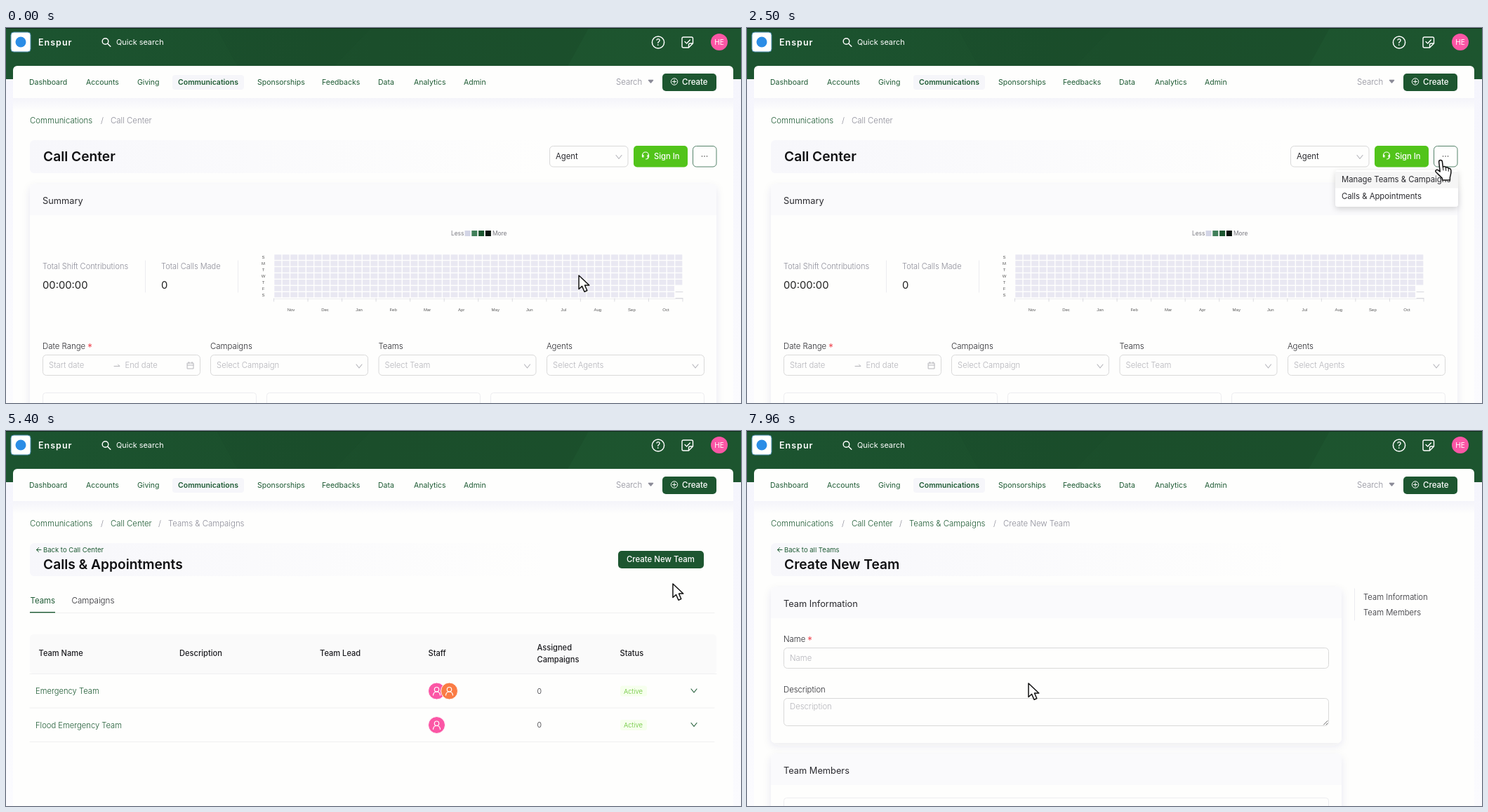
These frames come from a looping animation (1047 by 535 pixels, 8 s). An HTML page:

```html
<!DOCTYPE html>
<html lang="en">
<head>
<meta charset="utf-8">
<title>Call center walkthrough</title>
<style>
html, body { margin: 0; width: 100%; height: 100%; overflow: hidden; background: #fdfdfd; }
svg { display: block; width: 100%; height: 100%; font-family: Inter, "Noto Sans", sans-serif; }
</style>
</head>
<body>
<svg viewBox="0 0 1047 535">
  <defs>
    <linearGradient id="banner"><stop offset="0" stop-color="#1c5430"/><stop offset=".5" stop-color="#1b4e2b"/><stop offset="1" stop-color="#1b502c"/></linearGradient>
    <linearGradient id="page" x2="0" y2="1"><stop offset="0" stop-color="#f4f4fc"/><stop offset="1" stop-color="#fbfbfe"/></linearGradient>
    <linearGradient id="navShade" x2="0" y2="1"><stop offset="0" stop-color="#f4f4fa"/><stop offset="1" stop-color="#fefefd"/></linearGradient>
    <linearGradient id="heading"><stop offset="0" stop-color="#f7f7fb"/><stop offset=".75" stop-color="#fefefd"/></linearGradient>
    <filter id="soft" x="-10%" y="-20%" width="120%" height="150%"><feDropShadow dx="0" dy="4" stdDeviation="6" flood-color="#3c3c78" flood-opacity=".09"/></filter>
    <filter id="popup" x="-10%" y="-30%" width="120%" height="170%"><feDropShadow dx="0" dy="3" stdDeviation="4" flood-opacity=".16"/></filter>
  </defs>
  <g id="shell"></g>
  <g id="summary"></g>
  <g id="menu"></g>
  <g id="teams"></g>
  <g id="form"></g>
  <g id="status"></g>
  <g id="arrow"><path d="M0 0V19.5L4.6 15.4 8 23.2 11.8 21.5 8.5 14H14.8Z" fill="#fff" stroke="#111" stroke-width="1.5" stroke-linejoin="round"/></g>
  <g id="hand"><path d="M-2.6 2.6C-2.6-.6 2-.6 2.2 2.4L3.2 10.4C4.2 8.6 7 9 7.2 11 8.4 9.8 10.8 10.3 11 12.2 13.4 11.4 14.6 13 14.7 15.5 15 20 13.6 22 13.2 25V28.6H2.2V26C-1 23.4-3.6 20-6.8 17.2-8.8 14.8-5.6 13.2-3.6 14.6L-1 16.6Z" fill="#fff" stroke="#111" stroke-width="1.5" stroke-linejoin="round"/><path d="M3.2 10.4 3.7 15M7.2 11 7.5 15.6M11 12.2V16.4" fill="none" stroke="#111"/></g>
</svg>
<script>
const $ = id => document.getElementById(id);
const GREEN = '#1d5a33', INK = '#2b2b30', GREY = '#8c8c98', HINT = '#b4b4ba', LINE = '#d9d9d9';
const LOOP = 8000;

// y is the middle of the capital letters
const text = (x, y, s, size = 11.3, fill = INK, weight = 300, extra = '') =>
  `<text x="${x}" y="${y + size * .36}" font-size="${size}" fill="${fill}" font-weight="${weight}" ${extra}>${s.replace('&', '&amp;')}</text>`;
const rect = (x, y, w, h, r, fill, stroke = 'none', extra = '') =>
  `<rect x="${x}" y="${y}" width="${w}" height="${h}" rx="${r}" fill="${fill}" stroke="${stroke}" ${extra}/>`;
const path = (d, stroke, width = 1, fill = 'none') =>
  `<path d="${d}" fill="${fill}" stroke="${stroke}" stroke-width="${width}" stroke-linecap="round" stroke-linejoin="round"/>`;
const circle = (x, y, r, fill, stroke = 'none', width = 1) =>
  `<circle cx="${x}" cy="${y}" r="${r}" fill="${fill}" stroke="${stroke}" stroke-width="${width}"/>`;
const chevron = (x, y, color = HINT) => path(`M${x - 4} ${y - 2}l4 5 4-5`, color, 1.1);
const required = (x, y) => text(x, y + 2, '*', 14, '#f0505a', 400);
const list = (items, draw) => items.map(draw).join('');

const card = (y, w, h, title) =>
  rect(34, y, w, h, 6, '#fefefd', 'none', 'filter="url(#soft)"') +
  path(`M34 ${y + 44}V${y + 6}q0-6 6-6H${28 + w}q6 0 6 6V${y + 44}Z`, 'none', 0, '#fafafc') +
  text(52, y + 23, title, 12.8, INK, 400);

const crumbs = items => list(items, ([x, s], i) =>
  (i ? text(x - 14, 132, '/', 11.3, GREY) : '') +
  text(x, 132, s, 11.4, i == items.length - 1 ? GREY : GREEN));
const heading = (title, back) => rect(34, 160, 978, 47, 6, 'url(#heading)') +
  (back ? path('M50 169.5H43.5M46.5 166.5l-3 3 3 3', GREEN) + text(53, 169.5, back, 9.5, GREEN, 400) : '') +
  text(53, back ? 190.5 : 183, title, 19.2, '#101012', 600);

function drawShell() {
  const nav = [[33, 'Dashboard'], [114, 'Accounts'], [187, 'Giving'], [245, 'Communications'], [358, 'Sponsorships'],
    [450, 'Feedbacks'], [530, 'Data'], [581, 'Analytics'], [652, 'Admin']];
  return rect(0, 0, 1047, 535, 0, 'url(#page)') + rect(0, 0, 1047, 73, 0, 'url(#banner)') +
    path('M300 0H520L450 73H340Z', 'none', 0, '#1a4a2840') + path('M830 0H1047V73H790Z', 'none', 0, '#26693a30') +
    rect(0, 0, 1047, 1, 0, '#0e2a17') +
    rect(10, 54, 1026, 500, 6, '#fefefd') + rect(10, 100, 1026, 18, 0, 'url(#navShade)') +
    rect(7, 6, 28, 28, 4, '#fff', '#4d8fb0') + circle(21, 20, 7.5, '#2b8de6') +
    text(46, 20, 'Enspur', 12.5, '#fff', 600, 'letter-spacing="1"') +
    circle(141.5, 19, 4.3, 'none', '#fff', 1.4) + path('M144.8 22.3l4 4', '#fff', 1.5) +
    text(157, 20, 'Quick search', 10.9, '#fff', 400) +
    circle(929, 20.5, 8.6, 'none', '#fff', 1.5) + text(929, 20.5, '?', 12.5, '#fff', 500, 'text-anchor="middle"') +
    path('M978.5 22V15q0-2-2-2H965q-2 0-2 2V26q0 2 2 2H972.5L978.5 22H974.5q-2 0-2 2V28M967 19.5l2.6 2.6 4.8-5', '#fff', 1.4) +
    circle(1016, 20, 12, '#fb56a5') + text(1016, 20.5, 'HE', 10, '#fff', 400, 'text-anchor="middle"') +
    rect(237, 67, 102, 21, 4, '#f6f6fa') +
    list(nav, ([x, s], i) => text(x, 77, s, 10.5, GREEN, i == 3 ? 600 : 400)) +
    text(869, 77, 'Search', 11.4, GREY) + path('M915.5 74.5h6l-3 3.5Z', GREY, 1.5, GREY) +
    rect(935, 65, 77, 25, 5, '#1d5630') + circle(952, 76.5, 4.7, 'none', '#fff') + path('M949.5 76.5h5M952 74v5', '#fff') +
    text(963, 77, 'Create', 11.5, '#fff', 500);
}

function drawHeatmap() {
  const months = 'Nov Dec Jan Feb Mar Apr May Jun Jul Aug Sep Oct'.split(' ');
  const label = (x, y, s) => text(x, y, s, 6, '#555', 400, 'text-anchor="middle" font-family="Liberation Sans, sans-serif"');
  let out = '';
  for (let col = 0; col < 51; col++)
    for (let row = 0; row < 7; row++)
      if (col < 50 || row < 5) out += rect(382.3 + col * 11.42, 323.3 + row * 8.93, 10, 7.5, 0, '#e9e8f2');
  return out + path('M954 376.5h10M954 385.5h10', '#d8d8de') +
    path('M381.5 386.5H964', '#e2e2e8', .6) +
    list([...Array(13).keys()], i => path(`M${381.5 + i * 48.54} 386v4`, '#d4d4da', .8)) +
    list(months, (s, i) => label(406 + i * 48.54, 402, s)) +
    list([...'SMTWTFS'], (s, i) => label(366.5, 327 + i * 8.9, s)) +
    text(634, 293, 'Less', 8.4, '#77777f', 400) + text(693, 293, 'More', 8.4, '#77777f', 400) +
    list(['#d3d5e6', '#41805a', '#1d5630', '#08120b'], (c, i) => rect(653.5 + i * 9.8, 289, 8, 8, 0, c));
}

function drawSummary() {
  const fields = [[52, 'Date Range', ''], [291, 'Campaigns', 'Select Campaign'], [530.5, 'Teams', 'Select Team'], [770, 'Agents', 'Select Agents']];
  return crumbs([[34, 'Communications'], [149, 'Call Center']]) + heading('Call Center') +
    rect(774.5, 168.5, 111.5, 29.5, 5, '#fefefd', LINE, 'id="agent"') + text(783, 183, 'Agent', 11.3, INK, 400) + chevron(873, 183.5) +
    rect(894, 168, 77, 30.5, 5, '#52c41a') +
    path('M906.5 184V181.5a4.5 4.5 0 0 1 9 0V184M906.5 181.5v2.5h1.5v-2.5ZM914 181.5v2.5h1.5v-2.5ZM915 184q0 3-3.5 3', '#fff', 1.2) +
    text(923, 183, 'Sign In', 11.2, '#fff', 500) +
    rect(978.5, 168.5, 33.5, 29.5, 5, '#fefefd', '#55836a') + list([991.5, 995, 998.5], x => circle(x, 183, .8, '#444')) +
    card(223, 978, 340, 'Summary') +
    text(52, 340, 'Total Shift Contributions', 11, GREY) + text(52, 367, '00:00:00', 14.8, '#222', 400) +
    text(221, 340, 'Total Calls Made', 11, GREY) + text(221, 367, '0', 14.8, '#222', 400) +
    path('M198.5 332v45M330.5 332v45', '#ececf0') + drawHeatmap() +
    list(fields, ([x, label, hint]) => text(x, 454, label, 11.4) + rect(x + .5, 466.5, 224, 29, 5, '#fefefd', LINE) +
      (hint ? text(x + 9, 481, hint, 11.3, HINT) + chevron(x + 212, 482) : '')) +
    required(116, 454) + text(61, 481, 'Start date', 11.3, HINT) + text(169.5, 481, 'End date', 11.3, HINT) +
    path('M154 482.5h8l-2.5-2.5M258.5 478h8.5v8h-8.5ZM258.5 481h8.5M260.5 476.5v2M265 476.5v2', '#b5b5ba') +
    list([52, 371, 690], x => rect(x + .5, 520.5, 304, 40, 4, '#fefefd', '#ededf0'));
}

const drawMenu = () => rect(838, 203, 175, 52, 4, '#fff', 'none', 'filter="url(#popup)"') +
  rect(838, 205, 175, 23.5, 0, '#f5f5f5') +
  text(847, 216, 'Manage Teams & Campaigns', 11.3, INK, 400) + text(847, 240, 'Calls & Appointments', 11.3, INK, 400);

const person = (x, y, color) => circle(x, y, 12, color, '#fefefd') + circle(x, y - 2.3, 3.2, 'none', '#fff', 1.2) +
  path(`M${x - 5} ${y + 6}q.5-5 5-5t5 5`, '#fff', 1.2);

function drawTeams() {
  const columns = [[46.5, 317.5, 'Team Name'], [247, 317.5, 'Description'], [447, 317.5, 'Team Lead'], [601.5, 317.5, 'Staff'],
    [756.5, 309, 'Assigned'], [756.5, 326, 'Campaigns'], [874.5, 317.5, 'Status']];
  const row = (y, name) => text(42, y, name, 11.2, GREEN) + text(756.5, y, '0', 10.6) +
    rect(875, y - 7.5, 38, 15, 3, '#f6ffed') + text(880, y + .5, 'Active', 9.4, '#62c22e') +
    chevron(980, y - 1, GREEN) + path(`M34 ${y + 24}H1009`, '#f0f0f1') + person(613.5, y, '#fb56a5');
  const empty =
    path('M501 438V411q0-3 3-3H534q3 0 3 3V438Z', 'none', 0, '#f8f8fa') + rect(505, 415, 28, 15, 1, '#f0f0f5') +
    path('M505 433.5h28M505 437.5h28', '#f0f0f4') +
    path('M492 444l8-10v8h38v-8l8 10Z', 'none', 0, '#e9eaee') +
    path('M492 444H506q2 0 2 3t3 3H527q3 0 3-3t2-3H546V462q0 3-3 3H495q-3 0-3-3Z', 'none', 0, '#f2f3f6') +
    path('M548 412l-3 2 1-5', 'none', 0, '#f3f3f8') + '<ellipse cx="553.5" cy="403.5" rx="11" ry="8.5" fill="#f3f3f8"/>' +
    list([549, 553.5, 558], x => circle(x, 404, 1.1, '#fff')) +
    text(519, 483.5, 'No Records Found', 10.7, '#dcdcdf', 400, 'text-anchor="middle"');
  return crumbs([[34, 'Communications'], [149, 'Call Center'], [231, 'Teams & Campaigns']]) +
    heading('Calls & Appointments', 'Back to Call Center') +
    rect(872, 171, 122, 25, 5, '#1d5630', 'none', 'id="create"') + text(884, 183, 'Create New Team', 11.4, '#fff', 500) +
    text(34.5, 242, 'Teams', 11.4, GREEN, 400) + text(93.5, 242, 'Campaigns', 11.6) +
    path('M34 259.5H1009', '#f0f0f0') + rect(34, 258, 36, 1.4, 0, GREEN) +
    '<g id="table">' + rect(34, 290, 978, 56.5, 5, '#fafafa') + path('M34 346.5H1012', '#f0f0f1') +
    list(columns, ([x, y, s]) => text(x, y, s, 11.1, '#1c1c20', 500)) +
    '<g id="rows">' + row(371, 'Emergency Team') + person(631.5, 371, '#fa7c45') + row(419.5, 'Flood Emergency Team') + '</g></g>' +
    `<g id="empty">${empty}<g id="spinner">${list([0, 1, 2, 3], () => circle(0, 0, 2.7, GREEN))}</g></g>`;
}

const drawForm = () =>
  crumbs([[34, 'Communications'], [149, 'Call Center'], [231, 'Teams & Campaigns'], [365, 'Create New Team']]) +
  heading('Create New Team', 'Back to all Teams') +
  card(223, 813, 222, 'Team Information') +
  text(52, 297, 'Name') + required(86, 297) + rect(52.5, 309.5, 776, 29, 5, '#fefefd', LINE) + text(61, 324, 'Name', 11.3, HINT) +
  text(52, 369, 'Description') + rect(52.5, 381.5, 776, 39, 5, '#fefefd', LINE) + text(61, 392.5, 'Description', 11.3, HINT) +
  path('M821.5 419l5.5-5.5M825 419l2-2', '#555', .9) +
  card(461, 813, 110, 'Team Members') + rect(52.5, 523.5, 776, 40, 4, '#fefefd', '#ededf0') +
  path('M865.5 225v45', '#ececf0') + text(878, 236.5, 'Team Information') + text(878, 259, 'Team Members');

const drawStatus = () => rect(-4, 528, 252, 12, 3, '#d8aca8') +
  text(2, 536.5, 'app.example/communications/call-center/teams/new', 9, '#222', 400);

const draws = { shell: drawShell, summary: drawSummary, menu: drawMenu, teams: drawTeams, form: drawForm, status: drawStatus };
for (const id in draws) $(id).innerHTML = draws[id]();

// start, end, then the points the pointer passes
const moves = [
  [10, 800, [816, 353], [735, 460], [605, 330], [700, 84], [835, 172]],
  [1010, 1800, [835, 172], [900, 127], [985, 160], [997, 186], [998, 178]],
  [2140, 2900, [998, 178], [996, 180], [972, 205], [950, 224]],
  [3080, 3230, [950, 224], [950, 217]],
  [5390, 6200, [950, 218], [905, 276], [850, 240], [872, 200], [897, 187]],
  [7830, 7960, [897, 187], [401, 360]],
];

const clamp = v => Math.min(1, Math.max(0, v));
const ramp = (t, from, to) => clamp((t - from) / (to - from));
const within = (t, from, to) => t >= from && t < to;
const spline = (a, b, c, d, u) =>
  b + u / 2 * (c - a + u * (2 * a - 5 * b + 4 * c - d + u * (3 * (b - c) + d - a)));

function pointer(t) {
  const [start, end, ...pts] = moves.findLast(m => m[0] <= t) || moves[0];
  const k = ramp(t, start, end), pos = k * k * (3 - 2 * k) * (pts.length - 1);
  const i = Math.min(pts.length - 2, Math.floor(pos));
  const p = n => pts[Math.min(pts.length - 1, Math.max(0, n))];
  return [0, 1].map(a => spline(p(i - 1)[a], p(i)[a], p(i + 1)[a], p(i + 2)[a], pos - i));
}

const show = (id, on) => $(id).style.display = on ? '' : 'none';
const fade = (id, v) => { $(id).setAttribute('opacity', v); show(id, v > 0); };

function render(t) {
  show('summary', t < 3760);
  show('teams', within(t, 3760, 6700));
  show('form', t >= 7100);
  fade('menu', ramp(t, 2150, 2350) * (1 - ramp(t, 3450, 3600)));
  fade('status', ramp(t, 6270, 6400) * (1 - ramp(t, 7100, 7300)));

  show('empty', t < 4560);
  show('rows', t >= 4560);
  fade('table', .32 + .68 * ramp(t, 4580, 4830));
  [...$('spinner').children].forEach((dot, i) => {
    const angle = (65 + (t - 4260) * .3 + i * 90) * Math.PI / 180;
    const phase = (1 + (t - 4260) / 1000 - i * .4 + 4) % 2;
    dot.setAttribute('cx', 523 + 6 * Math.cos(angle));
    dot.setAttribute('cy', 415.5 + 6 * Math.sin(angle));
    dot.setAttribute('opacity', .3 + .5 * (1 - Math.abs(phase - 1)));
  });

  $('agent').setAttribute('stroke', within(t, 740, 1180) ? '#41805a' : LINE);
  $('create').setAttribute('fill', t >= 6080 ? '#3f7a4f' : '#1d5630');

  const hand = within(t, 1520, 4330) || within(t, 6060, 7860);
  const [x, y] = pointer(t);
  for (const id of ['arrow', 'hand']) $(id).setAttribute('transform', `translate(${x} ${y})`);
  show('hand', hand);
  show('arrow', !hand);
}

const began = performance.now();
(function tick() {
  render((performance.now() - began) % LOOP);
  requestAnimationFrame(tick);
})();
</script>
</body>
</html>
```
